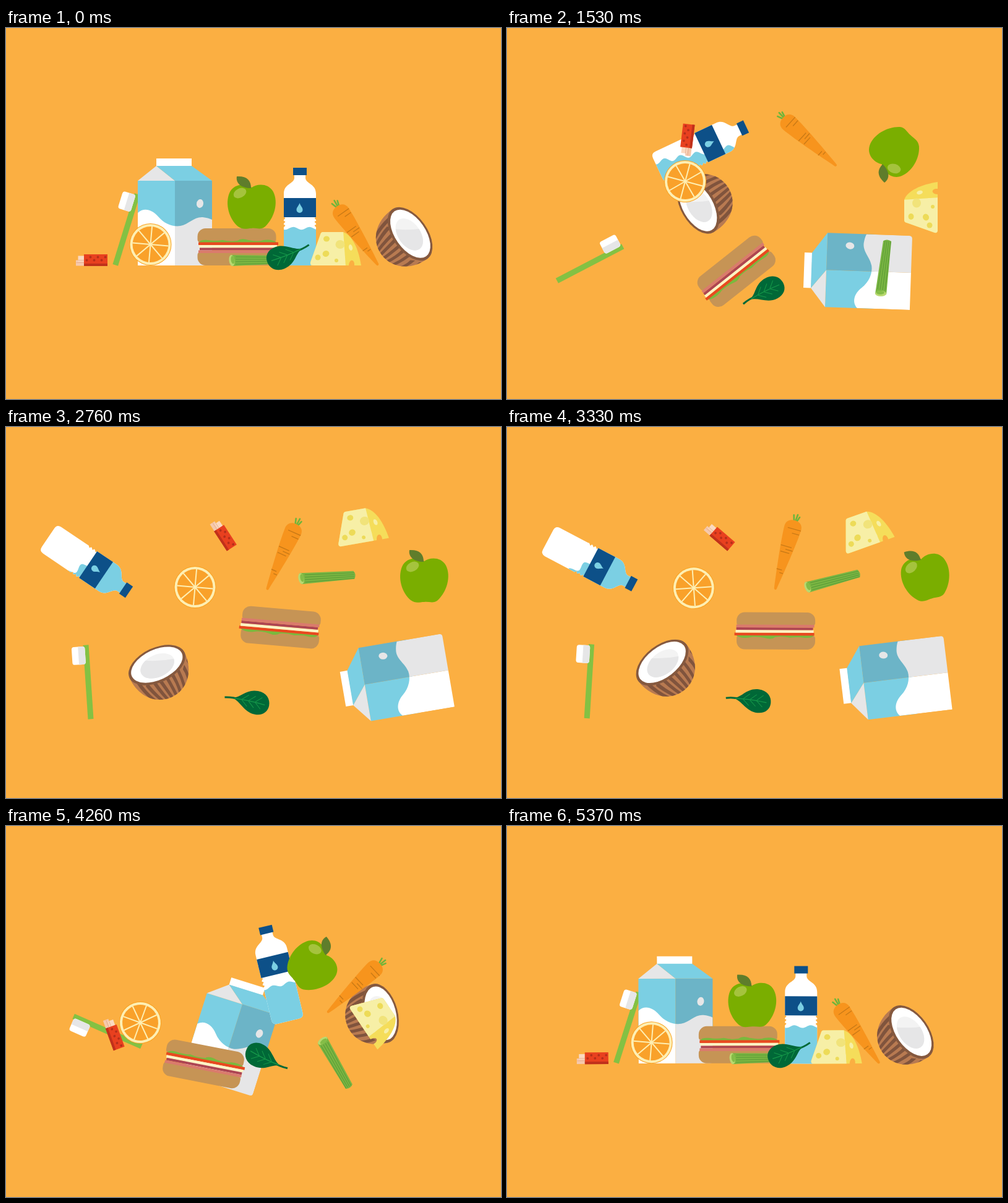
Animation, 800 px wide and 600 px high, one loop 5400 ms. Source, as an HTML page with a canvas:

```html
<!DOCTYPE html>
<html lang="en">
<head>
<meta charset="utf-8">
<title>Floating groceries</title>
<style>
html, body { margin: 0; width: 100%; height: 100%; overflow: hidden; background: #fbaf42; }
canvas { display: block; }
</style>
</head>
<body>
<canvas id="stage" width="800" height="600"></canvas>
<script>
const g = document.getElementById('stage').getContext('2d');
const LOOP = 5400, STEP = 30, RAD = Math.PI / 180;
const WHITE = '#ffffff', GREY = '#e6e6e7', SKY = '#7bcfe3', NAVY = '#0d5088';

const shape = (color, d) => { g.fillStyle = color; g.fill(new Path2D(d)); };
const line = (color, width, d) => {
  g.strokeStyle = color;
  g.lineWidth = width;
  g.stroke(new Path2D(d));
};
const rect = (color, x, y, w, h, r = 0) => {
  g.fillStyle = color;
  g.beginPath();
  g.roundRect(x, y, w, h, r);
  g.fill();
};
const oval = (color, x, y, rx, ry = rx, deg = 0) => {
  g.fillStyle = color;
  g.beginPath();
  g.ellipse(x, y, rx, ry, deg * RAD, 0, 7);
  g.fill();
};
const clipped = (path, draw) => {
  g.save();
  g.clip(path);
  draw();
  g.restore();
};

function brush() {
  rect('#84c143', -4.5, -60, 9, 120);
  rect(WHITE, -23.5, -58, 21.5, 29, 4);
  rect(GREY, -13, -58, 11, 29, [0, 4, 4, 0]);
}

function carton() {
  const wave = 'M213 299C222 290 236 293 246 305C256 317 270 322 282 320C296 317 304 305 318 306Q327 307 333 310';
  rect(WHITE, 243, 211, 57, 12.5);
  rect(SKY, 213, 247, 60, 80);
  rect('#6cb4c7', 273, 247, 60, 80);
  shape(GREY, 'M213 247L243 223L273 247Z');
  shape(SKY, 'M243 223H300L333 247H273Z');
  clipped(new Path2D(wave + 'V379Q333 384 328 384H213Z'), () => {
    rect(WHITE, 213, 280, 60, 105);
    rect(GREY, 273, 280, 60, 105);
  });
  oval(GREY, 313.5, 284, 5.5, 7, 10);
}

// Bottle outline with three ribs under the label
const bottleBody = (() => {
  let d = 'M466 237V243C465 252 449 252 449 268V306';
  for (let i = 0; i < 3; i++) d += 'q3 1 1 3q-2 1 -1 3';
  d = 'M484 237V243C485 252 501 252 501 268V306';
  for (let y = 306; y < 324; y += 6) d += `Q497 ${y + 1} 500 ${y + 3}Q502 ${y + 5} 501 ${y + 6}`;
  d += 'V376Q501 384 493 384H457Q449 384 449 376V324';
  for (let y = 324; y > 306; y -= 6) d += `Q448 ${y - 1} 450 ${y - 3}Q453 ${y - 5} 449 ${y - 6}`;
  return new Path2D(d + 'V268C449 252 465 252 466 243V237Z');
})();

function bottle(rot) {
  const tilt = Math.max(0, rot);
  g.fillStyle = WHITE;
  g.fill(bottleBody);
  clipped(bottleBody, () => {
    g.translate(475, 305);
    g.rotate(-tilt * 1.18 * RAD);
    const level = 19 - tilt * 0.16, amp = 2.2 + tilt * 0.02;
    g.fillStyle = SKY;
    g.beginPath();
    g.moveTo(-120, 160);
    for (let x = -120; x <= 120; x += 2) g.lineTo(x, level + amp * Math.sin(x / 4.2 + 1));
    g.lineTo(120, 160);
    g.fill();
  });
  rect(NAVY, 464, 226, 22, 12);
  rect(NAVY, 449, 275, 52, 31);
  shape(SKY, 'M474.500 283C476 288 479.500 290 479.500 294A5 5 0 0 1 469.500 294C469.500 290 473 288 474.500 283Z');
}

function sandwich() {
  const bun = '#c69455';
  rect(bun, -64.5, -30, 127, 23, [13, 13, 5, 5]);
  rect(bun, -64.5, 8, 127, 22, [5, 5, 13, 13]);
  shape('#7ab93d', 'M-62 -7Q-60 -12 -48 -11Q-36 -9 -24 -11Q-12 -8 0 -10Q6 -15 18 -11Q34 -8 42 -11Q56 -13 64 -7Z');
  rect('#e8491f', -63, -7.5, 129, 4.5);
  rect('#fdf3c4', -62, -3, 126, 4.5);
  rect('#ad4552', -61, 1.5, 124, 4);
  rect('#da7b6c', -63, 5.5, 126, 4.5);
}

function apple() {
  shape('#7aae00', 'M397 258C405 252 424 250 432 265C441 283 433 308 419 321C412 327 405 323 397 324C389 324 383 327 375 321C360 308 354 284 361 267C368 251 388 251 397 258Z');
  shape('#5f7d2b', 'M396 259C396 246 389 239 373 240C371 251 380 259 396 259Z');
  oval('#a5c33d', 378, 267, 11, 7.5, -28);
}

function celery() {
  shape('#7ab642', 'M-44 -9L43 -8Q48 -2 44 5L-42 9Z');
  for (let i = 0; i < 4; i++) line('#5c9b38', 1.1, `M-36 ${i * 4 - 6}L44 ${i * 3 - 5}`);
  oval('#b9d970', -42, 0, 4.5, 9, -8);
  oval('#84bd47', -40.5, -1, 3, 6.5, -8);
}

function leaf() {
  const vein = '#16994a';
  line('#006837', 3, 'M10 0Q24 2 37 -1');
  shape('#006837', 'M24 1C12 2 6 19 -14 19C-28 19 -36 10 -36 -1C-36 -12 -28 -19 -16 -19C2 -19 10 -3 24 0Z');
  line(vein, 1.3, 'M-29 -1Q0 2 22 0');
  for (const x of [-20, -9, 2]) line(vein, 1, `M${x + 7} 0L${x - 3} -9M${x + 7} 1L${x - 3} 10`);
}

function coconut(rot) {
  const shell = new Path2D('M-49 0C-49 36 -26 57 0 57C26 57 49 36 49 0Z');
  g.fillStyle = '#b87a51';
  g.fill(shell);
  clipped(shell, () => {
    for (let i = 0; i < 9; i++) {
      const x = -42 + i * 11, end = x * 0.7 + 4, top = i % 2 ? 24 : 14;
      shape('#80543d', `M${x} ${top}Q${x + 3} 38 ${end} 58H${end + 5}Q${x + 8} 36 ${x + 5} ${top - 6}Z`);
    }
  });
  oval('#85593f', 0, 0, 49, 28);
  oval(WHITE, 0, -0.5, 44.5, 24.5);
  const hollow = new Path2D();
  hollow.ellipse(0, 1.5, 29, 18, 0, 0, 7);
  g.fillStyle = '#f3f3f3';
  g.fill(hollow);
  clipped(hollow, () => {
    g.rotate(-rot * RAD);
    shape(GREY, 'M-50 -12Q0 0 50 -16V60H-50Z');
  });
}

function cheese() {
  const body = new Path2D('M512 330H545C560 335 570 358 574 384H563C564 374 555 372 554 384H496Q491 384 492 379L508 334Q509 330 512 330Z');
  const pale = '#f7efa6', deep = '#f5dd5a';
  clipped(body, () => {
    rect(deep, 490, 328, 90, 60);
    shape(pale, 'M488 328H545L549 386H488Z');
    oval('#eddb58', 518, 341, 5, 4.5);
    oval('#eddb58', 504, 371, 4.5, 4.5);
    oval('#eddb58', 517, 365, 5.5, 5, -25);
    oval('#eddb58', 534, 376, 3, 3);
    oval('#f1e37a', 540, 350, 7.5, 7);
    oval(pale, 557, 355, 3, 5, -15);
    oval(pale, 545, 371, 3, 4.5, -10);
  });
}

function carrot() {
  g.lineCap = 'round';
  line('#6fb53a', 2.6, 'M-1 -56L-4 -66M1 -56L2 -68M3 -56L6 -65');
  shape('#f7941d', 'M0 -58C9 -58 14 -53 14 -45C13 -20 6 30 2 57Q0 60 -2 57C-6 30 -13 -20 -14 -45C-14 -53 -9 -58 0 -58Z');
  g.lineCap = 'butt';
  line('#c97a16', 1.4, 'M-8 -44H14M1 -37H13M-11 -14H7M-2 -9H10M-9 -4H6M-7 25H2M-1 30H5');
}

function orange() {
  oval('#f9a11f', 0, 0, 34);
  oval('#feefb3', 0, 0, 33);
  oval('#f9a12a', 0, 0, 29);
  for (let i = 0; i < 8; i++) {
    const a = (i * 45 + 5) * RAD;
    line('#feefb3', 2, `M0 0L${29 * Math.cos(a)} ${29 * Math.sin(a)}`);
  }
}

function gum() {
  rect('#f6c9ac', -25.5, 0, 14, 9);
  rect('#fbd9c0', -22, -7, 12, 9);
  line('#e2a78b', 0.8, 'M-25 4H-12M-22 0H-12');
  rect('#e8401f', -12.5, -9.5, 38, 19);
  rect('#c0311b', -12.5, 5.5, 38, 4);
  for (let i = 0; i < 6; i++) oval('#b52f1a', -8 + i * 6, i % 2 ? -5 : 0, 1.9);
}

// Six poses as x, y, degrees: rest, lift, spread, float, gather, return
const items = [
  [brush, [194.5, 326, 17.2, 184, 328, -32.4, 134, 381, -297.6, 133, 412.5, -363.8, 132, 403, -307.6, 164, 332, -66.2]],
  [carton, [273, 297, 0, 300, 311, -4, 566, 393, -88, 629, 408, -99.7, 608, 406, -78.5, 367, 336, 17.5],
    [273, 297], { 1850: [650, 420, -84] }],
  [bottle, [475, 305, 0, 459, 257, -11.7, 315, 193, 64.7, 133.5, 223, 124, 155, 194.5, 76.5, 437.5, 239, -13.6],
    [475, 305], { 1330: [405, 186, 22], 4030: [330, 176, 28] }],
  [sandwich, [374, 354, 0, 349, 380, 5.6, 370, 394, 141.6, 443, 324, 185, 371, 368, 148.4, 320, 385, 11]],
  [apple, [397, 288, 0, 425, 254, 42, 627, 199, 225, 676, 247, 360, 684, 214, 247, 494, 227, 53], [397, 288]],
  [celery, [407, 376, 0, 457, 396, 46, 610, 388, 278, 519, 243, 357, 576, 288, 272, 532, 384, 61]],
  [leaf, [456, 366, -23, 450, 385, 5, 414, 428, 152, 390, 443, 191, 395, 431, 157.5, 421, 377, 25]],
  [coconut, [653, 333, 55, 641, 330, 62, 309, 288, 240, 244, 385, 335, 297, 354, 237, 605, 303, 75]],
  [cheese, [533, 358, 0, 586, 379, 40, 670, 290, 270, 574, 161, 350, 614, 208, 276, 599, 313, 56], [533, 358]],
  [carrot, [568, 336, -35, 558, 302, 13, 489, 184, 312, 445.5, 210, 384, 475, 186, 323, 562, 262, 47]],
  [orange, [233.5, 350, 0, 230, 322, 30, 288, 248, 280, 305.5, 259, 360, 277, 268.5, 290, 217, 318, 60]],
  [gum, [138.5, 375.5, 0, 164, 339, 42, 291, 181, 277, 351, 174, 417, 290, 195, 293.5, 174, 336, 70]]
].map(([draw, nums, origin = [0, 0], extra = {}]) => {
  const [rest, lift, spread, float, gather, back] = [0, 3, 6, 9, 12, 15].map(i => nums.slice(i, i + 3));
  const mix = (a, b, k) => a.map((v, i) => v + (b[i] - v) * k);
  const keys = {
    0: rest, 620: mix(rest, lift, -0.15), 1080: lift, 1530: spread,
    1850: mix(float, spread, 0.06), 2760: float, 3480: mix(float, gather, 0.2),
    3810: gather, 4260: back, 4680: mix(rest, back, -0.15),
    5130: mix(rest, back, -0.08), 5370: mix(rest, back, -0.006), 5400: rest, ...extra
  };
  const times = Object.keys(keys).map(Number);
  const tracks = [0, 1, 2].map(i => track(times, times.map(t => keys[t][i])));
  return { draw, origin, tracks };
});

// Smooth curve through the keys that never swings past them
function track(t, v) {
  const n = t.length;
  const slope = i => (v[i + 1] - v[i]) / (t[i + 1] - t[i]);
  const m = t.map((_, i) => {
    if (i === 0 || i === n - 1) return 0;
    const a = slope(i - 1), b = slope(i);
    return a * b > 0 ? 2 * a * b / (a + b) : 0;
  });
  return time => {
    let i = 0;
    while (i < n - 2 && time >= t[i + 1]) i++;
    const h = t[i + 1] - t[i], u = (time - t[i]) / h, w = 1 - u;
    return v[i] * w * w * (1 + 2 * u) + v[i + 1] * u * u * (3 - 2 * u)
      + h * u * w * (m[i] * w - m[i + 1] * u);
  };
}

function frame(now) {
  const t = Math.floor(now % LOOP / STEP) * STEP;
  g.fillStyle = '#fbaf42';
  g.fillRect(0, 0, 800, 600);
  for (const { draw, origin, tracks } of items) {
    const [x, y, rot] = tracks.map(f => f(t));
    g.save();
    g.translate(x, y);
    g.rotate(rot * RAD);
    g.translate(-origin[0], -origin[1]);
    draw(rot);
    g.restore();
  }
}

const start = performance.now();
function tick() {
  frame(performance.now() - start);
  requestAnimationFrame(tick);
}
tick();
</script>
</body>
</html>
```
